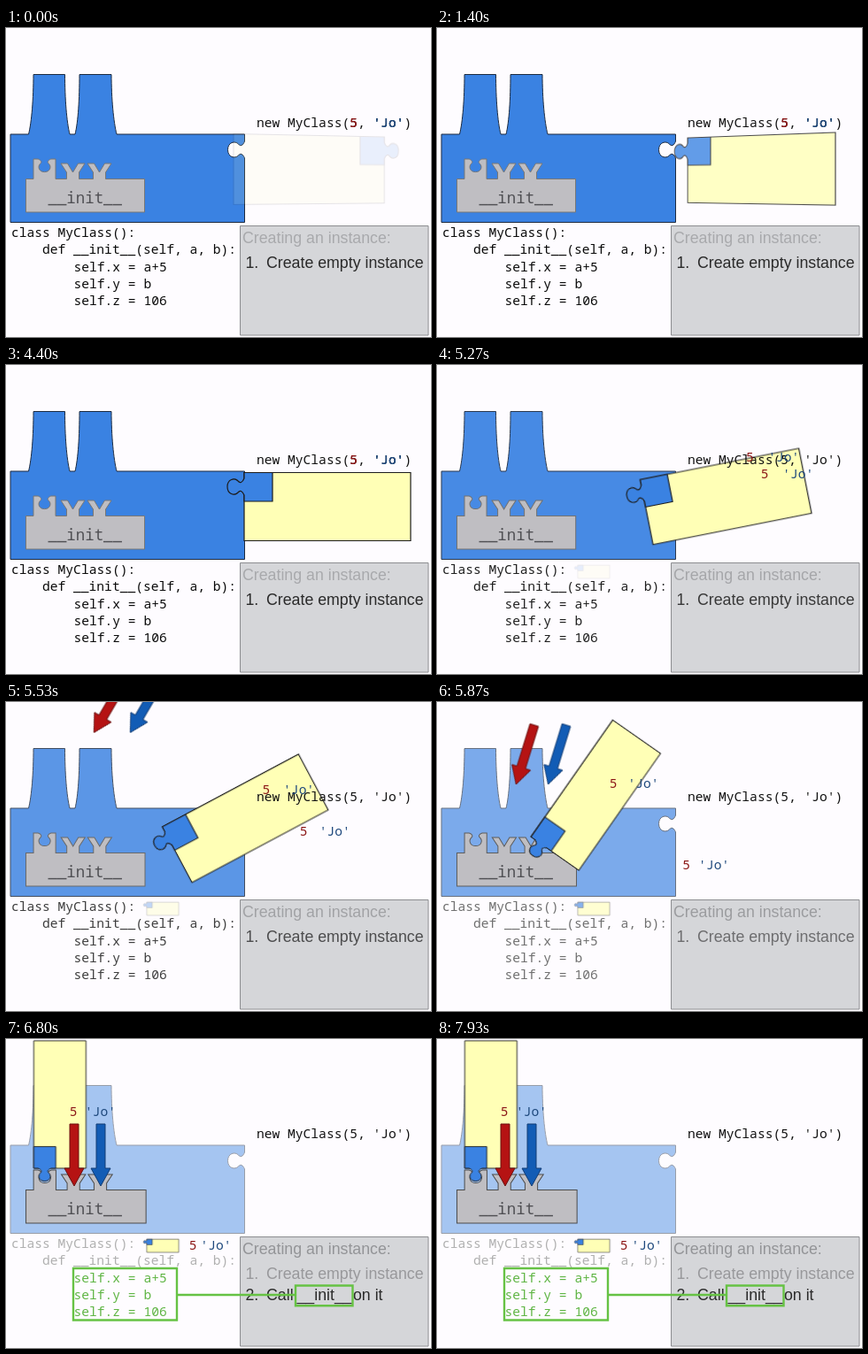
These frames come from a looping animation (480 by 349 pixels, 8 s). An HTML page:

```html
<!DOCTYPE html>
<html lang="en">
<head>
<meta charset="utf-8">
<title>Creating an instance</title>
<style>
  html, body { margin: 0; width: 100%; height: 100%; overflow: hidden; background: #fefcff; }
  .stage { position: relative; width: 480px; height: 349px; overflow: hidden; }
  .layer { position: absolute; left: 0; top: 0; width: 480px; height: 349px; }
  svg { display: block; overflow: visible; }

  .code { font: 14.62px "Noto Sans Mono", "DejaVu Sans Mono", monospace; }
  .list { font: 17.75px "Liberation Sans", Arial, sans-serif; }
  .number { fill: #8c1717; }
  .string { fill: #1f497d; }
  .block { fill: #bfbec2; }

  .move, .fade, .tint, .ink, .appear, .vanish, .flip { animation: 8s linear infinite; }
  .move { animation-name: move; }
  .fade { animation-name: fade; }
  .tint { animation-name: tint; }
  .ink { animation-name: ink; }
  .flip { animation-name: flip; transform-origin: 240px 174.5px; }
  .appear { animation-name: appear; animation-timing-function: step-end; }
  .vanish { animation-name: vanish; animation-timing-function: step-end; }

  @keyframes flip {
    0% { opacity: .111; transform: perspective(985px) translateX(113.5px) rotateY(-160deg) translateX(-113.5px); }
    22.65%, 100% { opacity: 1; transform: perspective(985px) translateX(113.5px) rotateY(0deg) translateX(-113.5px); }
  }
  /* The shared transition runs from 4.86 s to 6.63 s. */
  @keyframes move {
    0%, 60.8% { transform: var(--from, none); animation-timing-function: cubic-bezier(.37, 0, .63, 1); }
    82.85%, 100% { transform: var(--to, none); }
  }
  @keyframes fade {
    0%, 60.8% { opacity: var(--from, 1); animation-timing-function: cubic-bezier(.37, 0, .63, 1); }
    82.85%, 100% { opacity: var(--to, 1); }
  }
  @keyframes tint {
    0%, 60.8% { fill: var(--from, #0a0a0a); animation-timing-function: cubic-bezier(.37, 0, .63, 1); }
    82.85%, 100% { fill: var(--to, #b0b0b0); }
  }
  @keyframes ink {
    0%, 60.8% { stroke: #777; animation-timing-function: cubic-bezier(.37, 0, .63, 1); }
    82.85%, 100% { stroke: #4c4c4c; }
  }
  @keyframes appear { 0% { opacity: 0; } 83%, 100% { opacity: 1; } }
  @keyframes vanish { 0% { opacity: 1; } 83%, 100% { opacity: 0; } }
</style>
</head>
<body>
<div class="stage">
  <svg class="layer" viewBox="0 0 480 349">
    <defs>
      <g id="piece">
        <path fill="#ffffb6" d="M269 121.500H457V198.500H269Z"/>
        <path fill="#3a82e2" d="M269 121.500H301V154H269V147c-2-5-5-6-7-3c-4 4-12 2-12-6.500c0-8.500 8-10.500 12-6.500c2 3 5 2 7-3Z"/>
      </g>
      <path id="arrow" d="M-5-35H5V15H11L0 35L-11 15H-5Z"/>
      <g id="fields">
        <text x="76.500" y="274.500">self.x = a+5</text>
        <text x="76.500" y="293.500">self.y = b</text>
        <text x="76.500" y="313">self.z = 106</text>
      </g>
    </defs>

    <path class="fade" style="--to:.45" fill="#3a82e2" stroke="#1d2b40"
      d="M5 120H25.500C29 106 31 80 31 52.500H66.500C66.500 80 68.500 106 72 120H78C81.500 106 83 80 83 52.500H119C119 80 121.500 106 125 120H269.500V128c-2 5-5 6-7 3c-4-4-12-2-12 6.500c0 8.500 8 10.500 12 6.500c2-3 5-2 7 3V219.500H5Z"/>

    <g class="move" style="--from:scale(1,1);--to:scale(1.012,1);transform-origin:22px 208px">
      <path class="block ink" stroke="#777"
        d="M22.500 208V170.500H31V148H36.200c3.900 1.500 4.600 3.800 2.300 5.400c-3 3-1.500 9.200 5 9.200c6.500 0 8-6.200 5-9.200c-2.300-1.600-1.600-3.900 2.300-5.400H56V170.500H68.500V163L62 153H69.500L75.500 163L81.500 153H89L82.500 163V170.500H98.500V163L92 153H99.500L105.500 163L111.500 153H119L112.500 163V170.500H156.500V208Z"/>
    </g>
    <text class="code" style="font-size:17.400px" x="47.500" y="197.500" fill="#505054">__init__</text>

    <g class="code tint">
      <text x="6" y="236">class MyClass():</text>
      <text x="41" y="255">def __init__(self, a, b):</text>
      <use class="vanish" href="#fields"/>
    </g>
    <g class="fade" style="--from:0" stroke="#333" stroke-width="3">
      <use href="#piece" transform="translate(159 226) scale(.192) translate(-269 -121)"/>
    </g>

    <path fill="#d5d6d9" stroke="#8c8d90" d="M264.500 223.500H477V347H264.500Z"/>
    <g class="list">
      <text class="tint" style="--from:#a8a9ac;--to:#939497" x="267" y="243">Creating an instance:</text>
      <g class="tint" style="--from:#2a2a2a;--to:#98989b">
        <text x="270.500" y="271">1.</text>
        <text x="294" y="271">Create empty instance</text>
      </g>
      <g class="appear" fill="#2a2a2a">
        <text x="270.500" y="295">2.</text>
        <text x="294" y="295">Call</text>
        <text x="328.500" y="295">__init__</text>
        <text x="392" y="295">on it</text>
      </g>
    </g>
  </svg>

  <div class="layer move" style="--from:translate(0,0) rotate(0deg) scale(1);--to:translate(-293px,-78.200px) rotate(-90deg) scale(.766);transform-origin:353.500px 159.500px">
    <svg class="layer flip" viewBox="0 0 480 349" stroke="#1c1c1c" stroke-width="1.200">
      <use href="#piece"/>
    </svg>
  </div>

  <svg class="layer" viewBox="0 0 480 349">
    <g stroke-width="1">
      <g transform="translate(77 131)">
        <use class="move" style="--from:translate(58px,-184px) rotate(44deg);--to:translate(0,0) rotate(0deg)" href="#arrow" fill="#b51313" stroke="#6b1010"/>
      </g>
      <g transform="translate(107 131)">
        <use class="move" style="--from:translate(74px,-184px) rotate(44deg);--to:translate(0,0) rotate(0deg)" href="#arrow" fill="#125cb5" stroke="#123c74"/>
      </g>
    </g>

    <g class="code">
      <text x="283" y="112" fill="#111">new MyClass(5, 'Jo')</text>
      <text class="number move" style="--from:translate(0,0);--to:translate(-316.500px,-25px)" x="388.200" y="112">5</text>
      <text class="string move" style="--from:translate(0,0);--to:translate(-325.500px,-25px)" x="414.500" y="112">'Jo'</text>
      <text class="number move" style="--from:translate(0,0);--to:translate(-181.500px,126px)" x="388.200" y="112">5</text>
      <text class="string move" style="--from:translate(0,0);--to:translate(-195px,126px)" x="414.500" y="112">'Jo'</text>
    </g>

    <g class="appear">
      <use class="code" href="#fields" fill="#5fb544"/>
      <path fill="none" stroke="#66c244" stroke-width="2.400" d="M76 259H193V317.500H76ZM193 289H327M327 278.500H391.500V301.200H327Z"/>
    </g>
  </svg>
</div>
</body>
</html>
```
